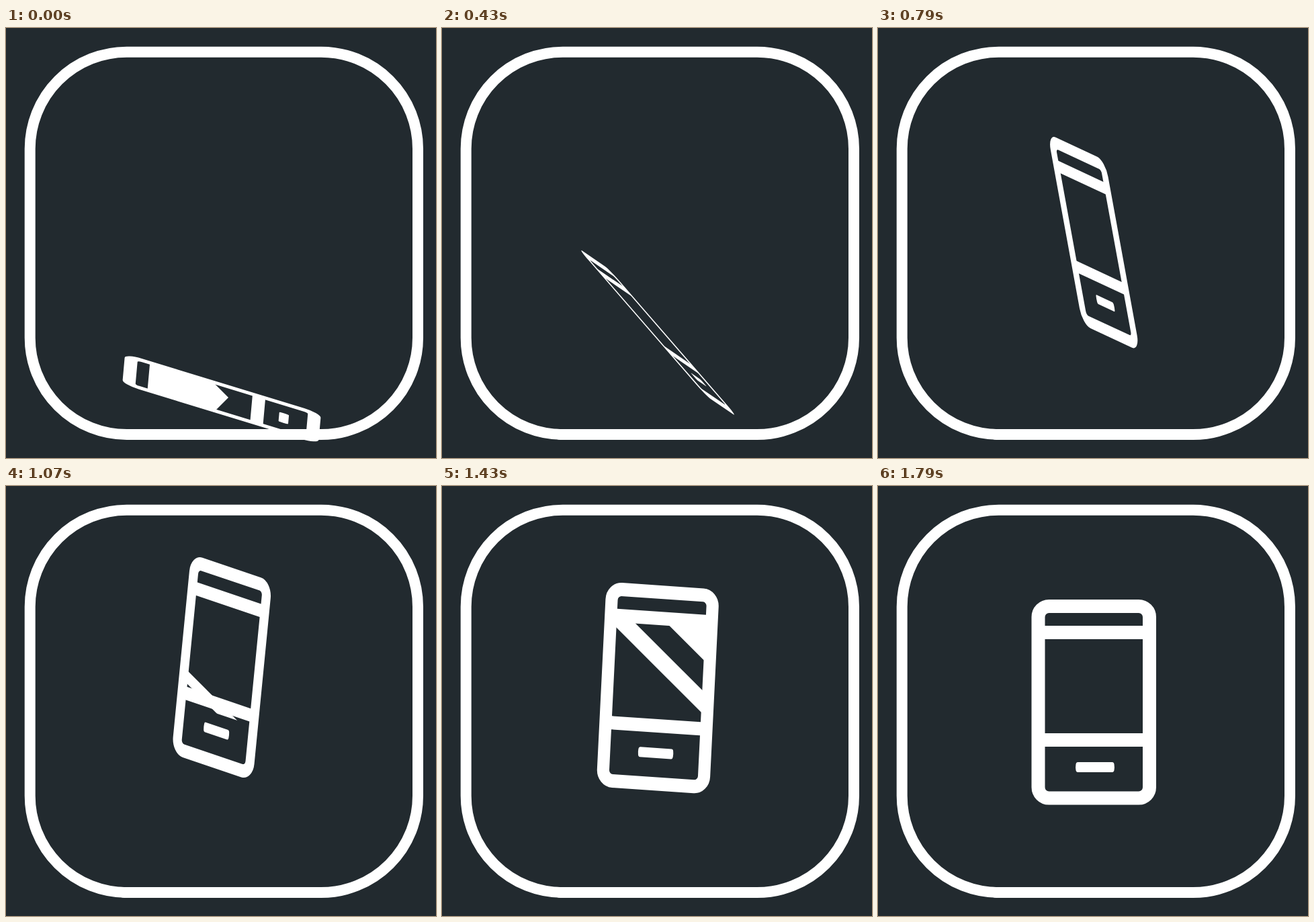
Animation, 640 px wide and 640 px high, one loop 2.93 s. Source, as an HTML page:

```html
<!DOCTYPE html>
<html lang="en">
<head>
<meta charset="utf-8">
<title>Phone icon</title>
<style>
html, body { margin: 0; width: 100%; height: 100%; overflow: hidden; background: #222a2f; }
svg { display: block; width: 100vw; height: 100vh; }
</style>
</head>
<body>
<svg viewBox="0 0 640 640">
  <defs>
    <clipPath id="screen"><rect id="pane" x="-79" y="-106" width="158" height="176.5"/></clipPath>
  </defs>
  <rect x="35.7" y="35.7" width="577.3" height="569.3" rx="144" fill="none" stroke="#fff" stroke-width="16"/>
  <g clip-path="url(#screen)">
    <g id="gleam" fill="#fff">
      <rect x="300" y="152" width="581" height="20"/>
      <rect x="300" y="219" width="581" height="135.5"/>
      <rect x="300" y="401.5" width="581" height="34.5"/>
    </g>
  </g>
  <g id="phone">
    <g transform="translate(-321.25 -322)" fill="#fff">
      <rect x="238.5" y="179" width="165.5" height="285.5" rx="16" fill="none" stroke="#fff" stroke-width="20"/>
      <path d="M240 208H402V228H240ZM240 368H402V388H240Z"/>
      <path d="M297.5 411h51q2.5 0 3 3 .8 4.5 0 9-.5 3-3 3h-51q-2.5 0-3-3-.8-4.5 0-9 .5-3 3-3z"/>
    </g>
  </g>
</svg>
<script>
const LOOP = 2930, FPS = 14, LAST = 25;
const $ = id => document.getElementById(id);
const rad = deg => deg * Math.PI / 180;

// Eased progress from 0 to 1 between steps a and b
function ease(k, a, b) {
  const p = Math.min(1, Math.max(0, (k - a) / (b - a)));
  return p * p * (3 - 2 * p);
}

// Flat view of a plane turned about y, then x, then z
function pose(x, y, z, cy) {
  const [sx, cx] = [Math.sin(x), Math.cos(x)];
  const [sy, cosY] = [Math.sin(y), Math.cos(y)];
  const [sz, cz] = [Math.sin(z), Math.cos(z)];
  const m = [cz * cosY - sz * sx * sy, sz * cosY + cz * sx * sy, -sz * cx, cz * cx, 321.25, cy];
  return `matrix(${m.map(v => v.toFixed(4)).join(' ')})`;
}

function draw(t) {
  const k = Math.min(LAST, Math.floor((t + 5) * FPS / 1000));
  const tilt = -3 - 17 * ease(k, 0, 8) + 20 * ease(k, 9, 23);
  const turn = -104 * (1 - (k / LAST) ** 1.21);
  const roll = -81.1 + 93 * ease(k, -4, 18) - 11.9 * ease(k, 12.5, 23.5);
  // Rise past the resting place, then settle back
  const height = 552 - 286 * ease(k, 0, 15.2) + 56 * ease(k, 13, 25);
  const phone = pose(rad(tilt), rad(turn), rad(roll), height);
  $('phone').setAttribute('transform', phone);
  $('pane').setAttribute('transform', phone);
  const shift = -608 * ease(k, 10.9, 23.7);
  $('gleam').setAttribute('transform', `matrix(.5 .5 -.5 .5 0 0) translate(0 ${shift.toFixed(2)})`);
}

const start = performance.now();
function tick() {
  draw((performance.now() - start) % LOOP);
  requestAnimationFrame(tick);
}
tick();
</script>
</body>
</html>
```
